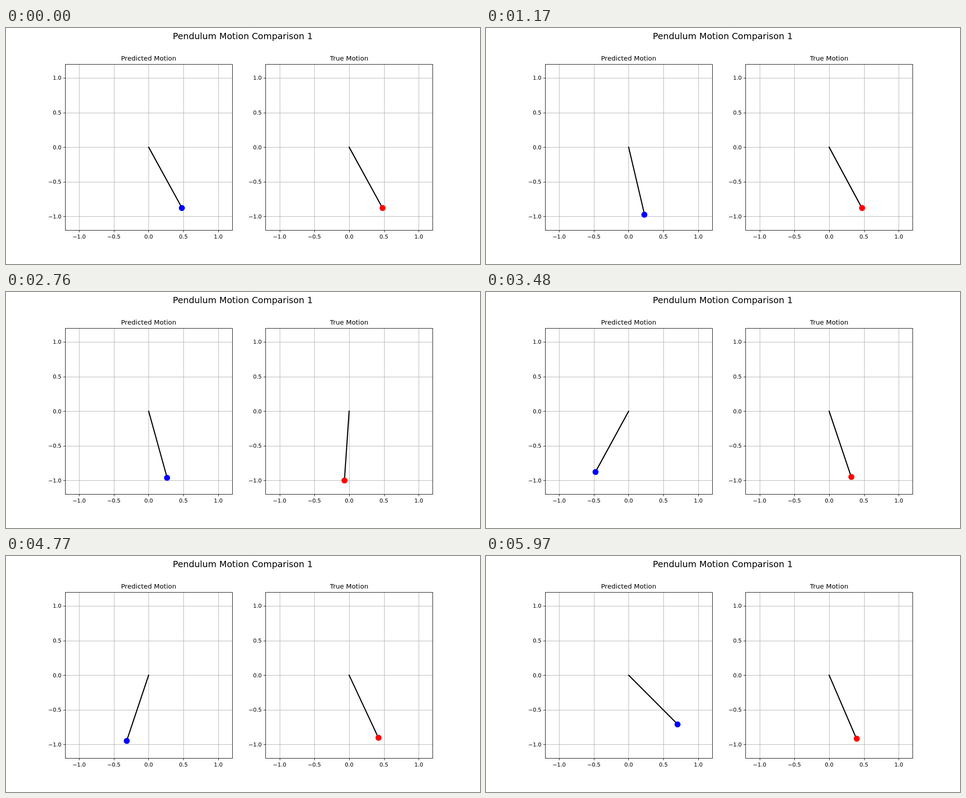
An HTML page with a canvas that plays this animation: 1058x529 px, repeating every 6000 ms.

```html
<!DOCTYPE html>
<html lang="en">
<head>
<meta charset="utf-8">
<title>Pendulum Motion Comparison</title>
<style>
  html, body { margin: 0; width: 100%; height: 100%; overflow: hidden; background: #fff; }
  canvas { display: block; width: 1058px; height: 529px; }
</style>
</head>
<body>
<canvas id="stage" width="1058" height="529"></canvas>
<script>
const ctx = document.getElementById('stage').getContext('2d');

const STEP_MS = 30, STEPS = 200;
const PT = 1.225;            // pixels per typographic point
const UNIT = 155.3;          // pixels per data unit
const HALF_WIDTH = 186.45;   // half the width of a plot
const TOP = 81.5, BOTTOM = 453.5;
const PIVOT_Y = 267.16;
const TICKS = [-1, -0.5, 0, 0.5, 1];

const crisp = v => Math.round(v) + 0.5;
const pixelCenter = v => Math.floor(v) + 0.5;

// Undamped pendulum, semi-implicit Euler from rest.
function simulate(angle, gravity, dt) {
  const angles = [];
  for (let i = 0, velocity = 0; i < STEPS; i++) {
    angles.push(angle);
    velocity -= gravity * Math.sin(angle) * dt;
    angle += velocity * dt;
  }
  return angles;
}
const trueAngles = simulate(0.5, 9.81, 0.05);

// Faster swing that grows quickly, saturates and then fades slowly.
function predictedAngle(i) {
  const limit = 1.33 - 0.0007 * i;
  const amplitude = limit / Math.cbrt(1 + 16.95 * Math.exp(-0.158 * i));
  const phase = 2 * Math.PI / 21.755 * (i - 0.315) + 0.26 * Math.exp(-i / 12);
  return amplitude * (0.99 * Math.cos(phase) + 0.01 * Math.cos(3 * phase));
}

function line(x1, y1, x2, y2, color, width) {
  ctx.strokeStyle = color;
  ctx.lineWidth = width;
  ctx.beginPath();
  ctx.moveTo(x1, y1);
  ctx.lineTo(x2, y2);
  ctx.stroke();
}

function label(text, x, y, points, align = 'center') {
  ctx.font = `${points * PT}px "DejaVu Sans", sans-serif`;
  ctx.textAlign = align;
  ctx.fillStyle = '#000';
  ctx.fillText(text, x, Math.round(y));
}

function drawPlot(title, pivotX, angle, color) {
  const left = crisp(pivotX - HALF_WIDTH), right = crisp(pivotX + HALF_WIDTH);

  ctx.lineCap = 'butt';
  for (const value of TICKS) {
    const tickX = pivotX + value * UNIT, tickY = PIVOT_Y - value * UNIT;
    const x = crisp(tickX), y = crisp(tickY);
    const text = value.toFixed(1).replace('-', '\u2212');
    line(x, TOP, x, BOTTOM, '#b0b0b0', 0.98);
    line(left, y, right, y, '#b0b0b0', 0.98);
    line(x, BOTTOM, x, BOTTOM + 4.5, '#000', 0.98);
    line(left - 4.5, y, left, y, '#000', 0.98);
    label(text, tickX, 472, 10);
    label(text, left - 8.6, tickY + 4.5, 10, 'right');
  }

  const bobX = pivotX + UNIT * Math.sin(angle);
  const bobY = PIVOT_Y + UNIT * Math.cos(angle);
  ctx.lineCap = 'square';
  line(pivotX, PIVOT_Y, bobX, bobY, '#000', 2 * PT);
  ctx.fillStyle = color;
  ctx.beginPath();
  ctx.arc(pixelCenter(bobX), pixelCenter(bobY), 5.5 * PT, 0, 2 * Math.PI);
  ctx.fill();

  ctx.strokeStyle = '#000';
  ctx.lineWidth = 0.98;
  ctx.strokeRect(left, TOP, right - left, BOTTOM - TOP);
  label(title, pivotX, 73, 12);
}

function draw(now) {
  const i = Math.floor(now / STEP_MS) % STEPS;
  ctx.fillStyle = '#fff';
  ctx.fillRect(0, 0, 1058, 529);
  label('Pendulum Motion Comparison 1', 528.5, 25, 16);
  drawPlot('Predicted Motion', 318.4, predictedAngle(i), '#00f');
  drawPlot('True Motion', 765.92, trueAngles[i], '#f00');
}

let start;
function tick(now) {
  start ??= now;
  draw(now - start);
  requestAnimationFrame(tick);
}
draw(0);
requestAnimationFrame(tick);
</script>
</body>
</html>
```
